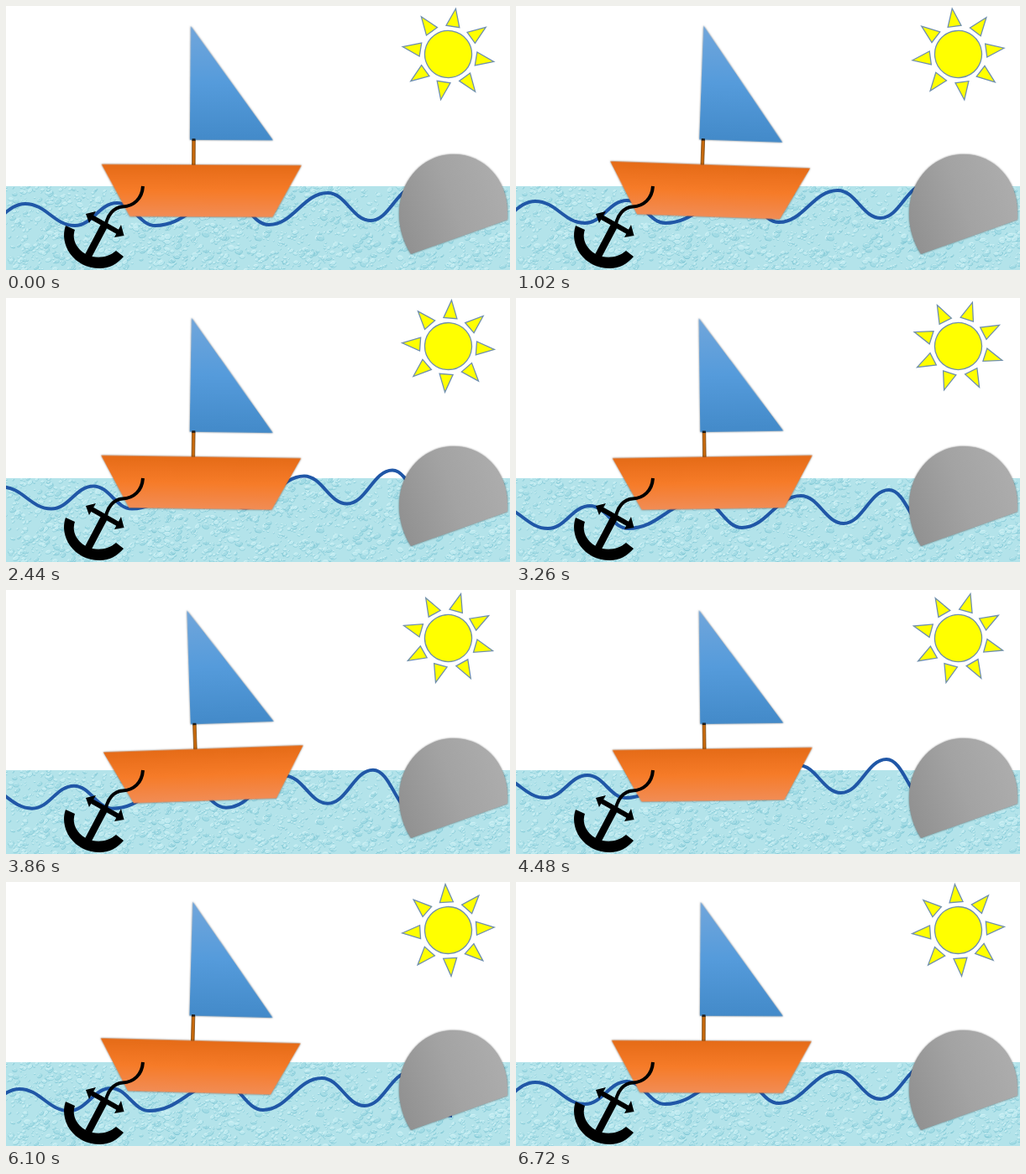
These frames come from a looping animation (600x315 px, 6.92 s). An HTML page with a canvas:

```html
<!DOCTYPE html>
<html lang="en">
<head>
<meta charset="utf-8">
<title>Boat at anchor</title>
<style>
  html, body { margin: 0; width: 100%; height: 100%; overflow: hidden; background: #fff; }
  canvas, svg { position: absolute; left: 0; top: 0; display: block; }
  canvas { top: 215px; }
  .soft { filter: drop-shadow(0 .6px .8px rgba(0, 0, 0, .5)); }
</style>
</head>
<body>
<canvas id="water" width="600" height="100"></canvas>
<svg width="600" height="315" viewBox="0 0 600 315">
  <defs>
    <linearGradient id="sail" x1="0" y1="0" x2="0" y2="1">
      <stop offset="0" stop-color="#71a6db"/>
      <stop offset=".5" stop-color="#559bdb"/>
      <stop offset="1" stop-color="#438ac9"/>
    </linearGradient>
    <linearGradient id="hull" x1="0" y1="0" x2="0" y2="1">
      <stop offset="0" stop-color="#e56b17"/>
      <stop offset=".5" stop-color="#f67b28"/>
      <stop offset="1" stop-color="#f18c55"/>
    </linearGradient>
    <linearGradient id="stone" gradientUnits="userSpaceOnUse" x1="470" y1="258" x2="595" y2="214">
      <stop offset="0" stop-color="#929292"/>
      <stop offset=".5" stop-color="#a3a3a3"/>
      <stop offset="1" stop-color="#adadad"/>
    </linearGradient>
  </defs>

  <g id="sun" fill="#ff0" stroke="#6f8fae" stroke-width="1.3" stroke-linejoin="miter">
    <circle r="28"/>
  </g>

  <path id="wave" fill="none" stroke="#2057a7" stroke-width="4"/>

  <g id="boat">
    <rect x="221.8" y="159" width="3.6" height="31" fill="#c8690c" stroke="#7a4a14" stroke-width=".8"/>
    <path class="soft" d="M219.4 24L219 159.7H318Z" fill="url(#sail)"/>
    <rect x="221.6" y="158.4" width="4" height="2.4" fill="#1c1c1c"/>
    <path class="soft" d="M114 189.5H352L318 251.5H148Z" fill="url(#hull)"/>
  </g>

  <path class="soft" fill="url(#stone)"
    d="M482 296C473 282 468 265 468 248C468 207 497 177 533 177C569 177 597 207 597 246V255Z"/>

  <g id="anchor">
    <path d="M163 215C162 230 152 239 139 239.5C128 240 121 250 119 260" fill="none" stroke="#000" stroke-width="4"/>
    <path d="M102 252L134 270" stroke="#000" stroke-width="6"/>
    <path d="M118 260L98 298" stroke="#000" stroke-width="8.5"/>
    <path d="M95 248L107 245L99 259ZM140.500 274L137 261L129 276Z"/>
    <path d="M71 262C63 284 80 313 112 313C123 313 132 308 140 299L131 292C123 299 113 301 103 299L95 296C84 290 78 278 82 267Z"/>
  </g>
</svg>
<script>
const $ = id => document.getElementById(id);

// Water: seeded droplets
function paintWater() {
  const g = $('water').getContext('2d');
  let seed = 11;
  const rnd = () => (seed = seed * 16807 % 2147483647) / 2147483647;
  g.fillStyle = '#b3e3ea';
  g.fillRect(0, 0, 600, 100);
  for (let i = 0; i < 1900; i++) {
    const x = rnd() * 600, y = rnd() * 100, r = 1 + 3.6 * rnd() ** 2;
    const tilt = rnd() * 1.2 - .9, flat = .55 + rnd() * .3;
    g.beginPath();
    g.ellipse(x, y, r, r * flat, tilt, 0, 7);
    g.fillStyle = rnd() < .6 ? 'rgba(190,234,240,.8)' : 'rgba(160,218,228,.8)';
    g.fill();
    g.lineWidth = .8;
    g.strokeStyle = 'rgba(105,186,203,.6)';
    g.beginPath();
    g.ellipse(x, y, r, r * flat, tilt, .2, 3);
    g.stroke();
    g.strokeStyle = 'rgba(222,247,249,.8)';
    g.beginPath();
    g.ellipse(x, y, r * .7, r * flat * .7, tilt, 3.4, 5.6);
    g.stroke();
  }
}

// Alternating troughs and crests joined by level-ended curves
function wavePath() {
  const pts = [[-30, 262], [23, 236], [82, 262], [132, 235], [178, 262], [264, 228],
    [313, 261], [383, 223], [434, 256], [488, 216], [538, 268]];
  return pts.map(([x, y], i) => {
    if (!i) return `M${x} ${y}`;
    const [px, py] = pts[i - 1], d = (x - px) * .42;
    return `C${px + d} ${py} ${x - d} ${y} ${x} ${y}`;
  }).join('');
}

// Drift of the wave: seconds, dx, dy
const drift = [[-.15, 0, 0], [0, 0, 0], [1.02, 0, -3], [1.6, -7, -11], [2.05, -17, -14.5],
  [2.44, -28, -10.5], [2.8, -36, 2], [3.26, -44, 13], [3.55, -49, 10], [3.85, -51, -1],
  [4.15, -50.5, -11], [4.48, -47, -14], [4.9, -37.5, -2], [5.2, -30, 8], [5.5, -22, 13],
  [5.75, -15, 15], [6.1, -7, 11], [6.72, 0, 3], [7.85, 0, 0]];

function driftAt(t) {
  let i = 1;
  while (t >= drift[i + 1][0]) i++;
  const [a, b, c, d] = [drift[i - 1], drift[i], drift[i + 1], drift[i + 2] || drift[i + 1]];
  const h = c[0] - b[0], u = (t - b[0]) / h;
  return [1, 2].map(k => {
    const m = (c[k] - a[k]) / (c[0] - a[0]) * h;
    const n = (d[k] - b[k]) / (d[0] - b[0]) * h;
    return b[k] + u * (m + u * (3 * (c[k] - b[k]) - 2 * m - n + u * (m + n - 2 * (c[k] - b[k]))));
  });
}

// Teeter: up to 2 degrees, a pause, then even swings
function tiltAt(t) {
  const s = t + .15;
  if (s < 1) return 2 * s;
  if (s < 2) return 2;
  return 2 * Math.abs((s - 2) % 4 - 2) - 2;
}

// Picture changes come in steps of about 200 ms
const LOOP = 6920;
const long = [0, 9, 12, 17, 20, 23, 31];
const starts = [0];
for (let i = 0; i < 33; i++) {
  starts.push(starts[i] + (long.includes(i) ? 220 : i === 18 ? 180 : 200));
}

function draw(now) {
  const ms = now % LOOP;
  const t = starts.findLast(s => s <= ms) / 1000;
  const [dx, dy] = driftAt(t);
  $('sun').setAttribute('transform', `translate(526.5 57.5) rotate(${9.3 + 71.65 * t})`);
  $('wave').setAttribute('transform', `translate(${dx} ${dy})`);
  $('boat').setAttribute('transform', `rotate(${tiltAt(t)} 233 138)`);
}

paintWater();
$('wave').setAttribute('d', wavePath());
for (let i = 0; i < 8; i++) {
  $('sun').insertAdjacentHTML('beforeend', `<path d="M0 -55L8 -33.500H-8Z" transform="rotate(${i * 45})"/>`);
}

const begin = performance.now();
function tick() {
  draw(performance.now() - begin);
  requestAnimationFrame(tick);
}
tick();
</script>
</body>
</html>
```
